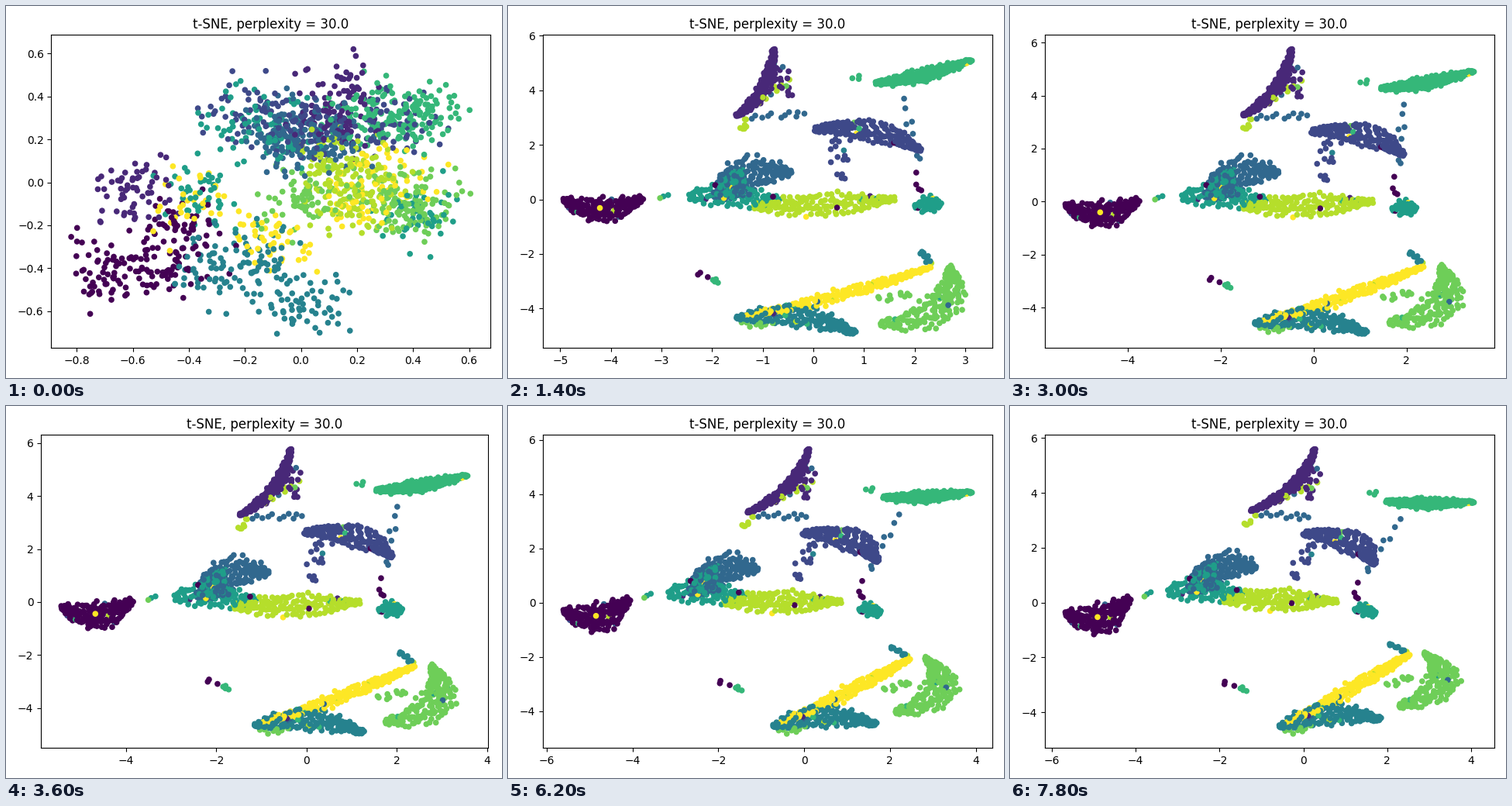
Recreate the animation shown at these times as a matplotlib script. Size 640x480 px, loop 8 s.

```python
import numpy as np
import matplotlib.pyplot as plt
from matplotlib.animation import FuncAnimation

FRAMES, STEP_MS = 40, 200
SPREAD_END = 7      # the cloud has split into clusters by this step
ASPECT = 1.7        # pixels per x unit over pixels per y unit
MARGIN = 1 / 22     # share of the axes left free on each side

rng = np.random.default_rng(4)
digits, places = [], []


def group(digit, n, width, a, b, c):
    """Spindle of n evenly spread dots along a quadratic curve a, b, c."""
    a, b, c = (np.array(p) * (ASPECT, 1) for p in (a, b, c))
    i = np.arange(n)
    s = np.clip((i + 0.5 + rng.normal(0, 0.8, n)) / n, 0, 1)[:, None]
    side = 2 * ((i * 0.618034 + rng.random()) % 1) - 1 + rng.normal(0, 0.18, n)
    pts = (1 - s) ** 2 * a + 2 * s * (1 - s) * b + s ** 2 * c
    slope = (1 - s) * (b - a) + s * (c - b)
    normal = slope[:, ::-1] * (-1, 1) / np.linalg.norm(slope, axis=1)[:, None]
    pts += normal * side[:, None] * width * (0.2 + 0.8 * np.sin(np.pi * s))
    digits.append(np.full(n, digit))
    places.append(pts / (ASPECT, 1))


def trail(digit, n, a, b):
    group(digit, n, 0.14, a, np.add(a, b) / 2, b)


group(0, 165, .42, (-4.95, .05), (-4.2, -.85), (-3.4, .1))
group(1, 150, .2, (-1.55, 3.05), (-.85, 3.8), (-.8, 5.5))
group(1, 20, .3, (-.8, 5.1), (-.7, 4.4), (-.45, 3.8))
group(2, 150, .38, (0, 2.55), (1.2, 2.9), (2.1, 1.8))
group(2, 15, .35, (.4, 2.2), (.5, 1.8), (.6, .7))
group(3, 165, .6, (-1.9, 0), (-1.6, 1.3), (-.45, 1))
group(4, 155, .38, (-1.55, -4.3), (-.2, -3.9), (.8, -4.85))
group(5, 80, .5, (-2.48, .15), (-1.6, .3), (-.7, -.05))
group(5, 45, .5, (-1.8, .1), (-1.6, .6), (-1.4, 1.1))
group(5, 45, .3, (1.98, -.25), (2.25, -.05), (2.5, -.15))
group(6, 165, .22, (1.2, 4.25), (2.1, 4.4), (3.11, 5.1))
group(7, 170, .55, (1.3, -4.5), (3.05, -4.3), (2.65, -2.4))
group(8, 160, .42, (-1.2, -.2), (0, -.25), (1.6, .05))
group(9, 155, .2, (-1.35, -4.2), (.6, -3.55), (2.3, -2.42))

trail(8, 7, (-1.45, 2.4), (-1.35, 3))
trail(8, 8, (-1.1, 3.5), (-.5, 4.4))
trail(3, 11, (-1.3, 3), (0, 3.2))
trail(6, 3, (.7, 4.4), (1, 4.45))
trail(3, 7, (1.7, 3.9), (2.1, 1.4))
trail(0, 4, (2, 1), (2.1, .2))
trail(0, 3, (-2.3, -2.7), (-2.1, -2.8))
trail(6, 4, (-2, -2.9), (-1.9, -3))
trail(4, 10, (2.1, -1.8), (2.3, -2.3))
trail(7, 12, (-1.5, -4.4), (-.8, -4.5))
trail(7, 10, (1.1, -3.6), (2, -3.4))
trail(5, 3, (-3.4, .1), (-2.8, .15))

digits, places = np.concatenate(digits), np.concatenate(places)
order = rng.permutation(len(digits))
digits, places = digits[order], places[order]
stray = rng.random(len(digits)) < 0.025
digits[stray] = rng.integers(0, 10, stray.sum())

# Centres of each digit in the starting cloud
HOMES = [
    [(-.71, -.42), (-.5, -.42), (-.42, -.25)],
    [(-.6, -.07), (.15, .38), (.13, .26)],
    [(-.18, .28), (.05, .22), (.35, .25)],
    [(-.05, .2), (.08, .17)],
    [(.03, -.58), (-.15, -.36), (-.32, -.42)],
    [(-.2, .24), (-.05, .2), (-.33, -.08), (.42, -.18)],
    [(.28, .3), (.44, .27)],
    [(.43, -.13), (.4, -.12), (.03, -.1)],
    [(.15, .08), (.22, -.1)],
    [(-.38, -.13), (-.1, -.28), (.2, -.1), (.35, 0)],
]


def home(digit):
    spread = np.clip(rng.normal(size=2), -2.6, 2.6) * (.075, .08)
    return rng.choice(HOMES[digit]) + spread


start = np.array([home(d) for d in digits])

# Axis limits over time: left, right, bottom, top
START_LIMITS = np.array((-.891, .676, -.772, .687))
LIMIT_STEPS = (7, 11, 18, 25, 39)
LIMITS = np.array([
    (-5.34, 3.535, -5.45, 6.03), (-5.64, 3.718, -5.55, 6.26),
    (-5.89, 4.02, -5.51, 6.31), (-6.03, 4.26, -5.41, 6.23),
    (-6.16, 4.554, -5.3, 6.113)])


def drift(q):
    """The middle slides left, both ends slide right, the whole twists."""
    x, y = places.T
    dx = 1.1 - 2 * np.exp(-(y - .3) ** 2 / 10)
    dy = -.08 * (x + .15) * y + (.3 - .05 * (x + 1) ** 2) * np.exp(-y ** 2 / 4)
    return np.column_stack([x + dx * (1 - (1 - q) ** 1.5), y + dy * q])


def fit(pts, limits):
    """Stretch the points to fill the axes up to the margin."""
    low, high = limits[::2], limits[1::2]
    unit = (pts - pts.min(axis=0)) / np.ptp(pts, axis=0)
    return low + (high - low) * (MARGIN + (1 - 2 * MARGIN) * unit)


def state(k):
    if k >= SPREAD_END:
        limits = np.array([np.interp(k, LIMIT_STEPS, c) for c in LIMITS.T])
        return drift((k - SPREAD_END) / (FRAMES - 1 - SPREAD_END)), limits
    u = 1 - (1 - k / SPREAD_END) ** 2.5
    return (start + (places - start) * u,
            START_LIMITS + (LIMITS[0] - START_LIMITS) * u)


fig, ax = plt.subplots(figsize=(6.4, 4.8), dpi=100)
dots = ax.scatter(*start.T, s=20, c=digits, cmap="viridis")
ax.set_title("t-SNE, perplexity = 30.0")


def update(k):
    pts, limits = state(k)
    dots.set_offsets(fit(pts, limits))
    ax.set_xlim(limits[:2])
    ax.set_ylim(limits[2:])
    fig.tight_layout()
    return dots,


anim = FuncAnimation(fig, update, frames=FRAMES, interval=STEP_MS, repeat=True)
plt.show()
```
